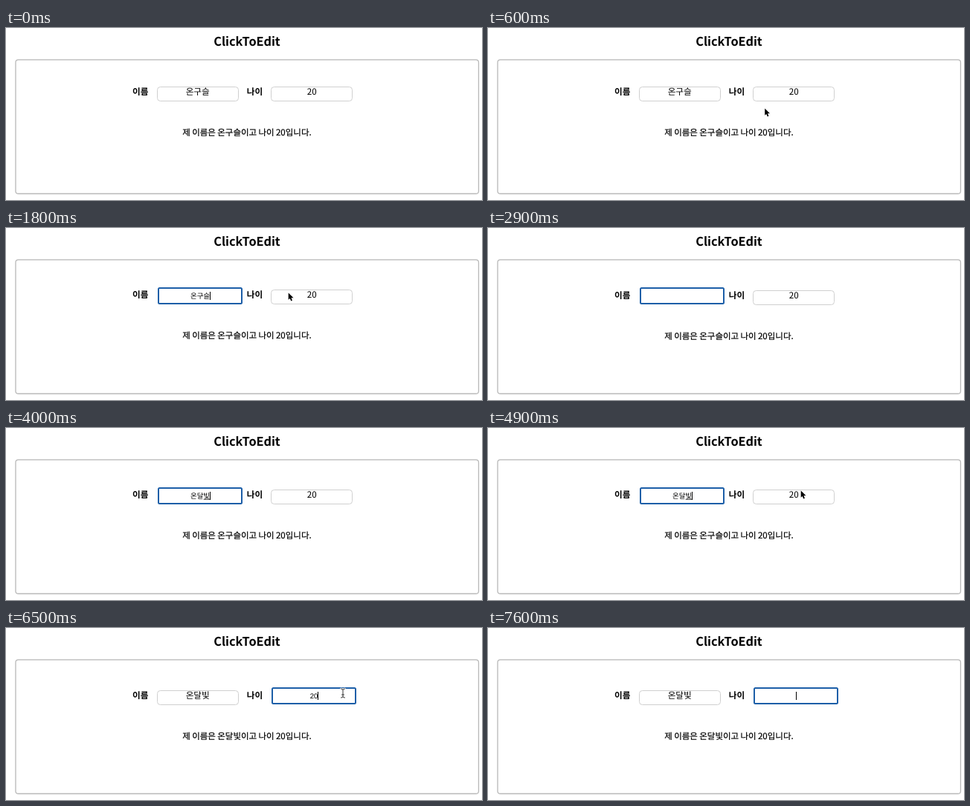
An HTML page for the animation above (8000 ms loop, 640 px wide and 232 px high).

```html
<!DOCTYPE html>
<html lang="ko">
<head>
<meta charset="utf-8">
<title>ClickToEdit</title>
<style>
  html, body { margin: 0; width: 100%; height: 100%; overflow: hidden; background: #fff; }
  svg { display: block; width: 640px; height: 232px; }
  text {
    font: 11.65px "Noto Sans CJK KR", "Noto Sans CJK", sans-serif;
    text-anchor: middle; text-rendering: geometricPrecision; fill: #000;
  }
  .bold { font-weight: 700; }
  .title { font-size: 16.3px; }
  .line { font-size: 11.5px; word-spacing: -.9px; stroke: #000; stroke-width: .2px; }
  .typed { font-size: 9.5px; font-family: "Liberation Sans", "Noto Sans CJK KR", "Noto Sans CJK", sans-serif; }
  .box { fill: #fff; stroke: #d0d0d0; }
  .focus { fill: #fff; stroke: #1d5fa8; stroke-width: 2; }
  .panel { fill: #fff; stroke: #b8b8b8; stroke-width: 1.2; }
  .shade { fill: none; stroke: #000; stroke-opacity: .07; stroke-width: 2; }
</style>
</head>
<body>
<svg viewBox="0 0 640 232">
  <text class="bold title" x="324" y="24.4">ClickToEdit</text>
  <rect class="shade" x="13" y="43.5" width="622.5" height="180.5" rx="4"/>
  <rect class="panel" x="13" y="42.9" width="622.4" height="180.5" rx="3.5"/>
  <g id="row">
    <text class="bold" x="180.7" y="90.4">이름</text>
    <text class="bold" x="334.5" y="90.4">나이</text>
    <g id="nameBox">
      <rect class="box" x="203.5" y="79.5" width="109" height="19" rx="4"/>
      <text id="name" x="257.7" y="90.4"></text>
    </g>
    <g id="ageBox">
      <rect class="box" x="356.5" y="79.5" width="109" height="19" rx="4"/>
      <text id="age" x="411.2" y="90.4">20</text>
    </g>
    <text id="line" class="line" x="324" y="144.9"></text>
  </g>
  <g id="input">
    <rect class="focus" x="-56" y="81" width="112" height="21" rx="1.5"/>
    <text id="typed" class="typed" x="0" y="94.6"></text>
    <path id="under" stroke="#000" stroke-width=".8"/>
    <path id="caret" stroke="#000"/>
  </g>
  <path id="arrow" d="M.2.5V9.8L2.2 8 3.8 11.5 5.4 10.8 4 7.3H7Z" stroke="#fff" stroke-width=".9" paint-order="stroke"/>
  <g id="beam" fill="none" stroke-linecap="round">
    <path d="M-2.5-6Q0-6 0-4.5Q0-6 2.5-6M0-4.5V4.5M-2.5 6Q0 6 0 4.5Q0 6 2.5 6M-1.5 2H1.5" stroke="#fff" stroke-width="2.4"/>
    <path d="M-2.5-6Q0-6 0-4.5Q0-6 2.5-6M0-4.5V4.5M-2.5 6Q0 6 0 4.5Q0 6 2.5 6M-1.5 2H1.5" stroke="#222" stroke-width=".9"/>
  </g>
</svg>
<script>
const LOOP = 8000;
const OLD = "온구슬", NEW = "온달빛";
const $ = id => document.getElementById(id);

// time, edited field, text, caret, composing
const edits = [
  [0, "", ""],
  [1500, "name", OLD, 1],
  [2000, "name", OLD, 0],
  [2200, "name", "온구", 1],
  [2400, "name", "온", 1],
  [2500, "name", "", 1],
  [2900, "name", "", 0],
  [3100, "name", "ㅇ", 1, 1],
  [3200, "name", "오", 1, 1],
  [3300, "name", "온", 1, 1],
  [3400, "name", "온ㄷ", 1, 1],
  [3600, "name", "온다", 1, 1],
  [3700, "name", "온달", 1, 1],
  [3900, "name", "온달비", 1, 1],
  [4000, "name", NEW, 1, 1],
  [4500, "name", NEW, 0, 1],
  [4900, "name", NEW, 1, 1],
  [5100, "", ""],
  [6300, "age", "20", 1],
  [7100, "age", "20", 0],
  [7300, "age", "2", 1],
  [7400, "age", "", 0],
  [7600, "age", "", 1]
];

// time, pointer shape, x, y
const moves = [
  [0, ""],
  [100, "arrow", 11, 206],
  [200, "arrow", 62, 196],
  [300, "arrow", 140, 180],
  [400, "arrow", 232, 157],
  [500, "arrow", 320, 131],
  [600, "arrow", 372, 108],
  [700, "arrow", 387, 94],
  [800, "arrow", 345, 86],
  [900, "arrow", 297, 83],
  [1100, "beam", 267.5, 88.5],
  [1600, "beam", 296, 84],
  [1700, "arrow", 345, 79],
  [1800, "arrow", 379.5, 87],
  [2200, ""],
  [4300, "arrow", 378.5, 88],
  [4500, "arrow", 384.5, 90],
  [4700, "arrow", 421, 82],
  [4900, "arrow", 420.5, 84],
  [5200, "arrow", 420.5, 86],
  [5300, "arrow", 421.5, 87],
  [5600, "arrow", 422.5, 87.5],
  [5700, "arrow", 423.5, 87.5],
  [5900, "arrow", 423, 87],
  [6000, "beam", 418, 90],
  [6100, "beam", 414, 89],
  [6400, "beam", 430, 88],
  [6500, "beam", 453, 88],
  [6700, "arrow", 508, 84],
  [6800, "arrow", 562, 87],
  [7300, ""]
];

const at = (table, t) => table.findLast(step => step[0] <= t);
const show = (el, on) => el.setAttribute("visibility", on ? "visible" : "hidden");
const place = (el, x, y) => el.setAttribute("transform", `translate(${x} ${y})`);
const setText = (el, s) => { if (el.textContent !== s) el.textContent = s; };

function drawForm(t) {
  const [, field, text, caret, composing] = at(edits, t);
  const name = t < 5100 ? OLD : NEW;
  // The row sits on the input's baseline, lower when the field is empty
  const drop = !field ? 0 : field === "name" && text ? 4 : 5;
  place($("row"), 0, drop);
  setText($("name"), name);
  setText($("line"), `제 이름은 ${name}이고 나이 20입니다.`);
  show($("nameBox"), field !== "name");
  show($("ageBox"), field !== "age");
  show($("input"), field);
  place($("input"), field === "age" ? 414 : 261, 0);
  setText($("typed"), text);
  const half = text ? $("typed").getComputedTextLength() / 2 : 0;
  const end = Math.round(half) + .5;
  $("caret").setAttribute("d", `M${end} 86V97`);
  $("under").setAttribute("d", `M${half - 8.5} 96.2H${half}`);
  show($("caret"), field && caret);
  show($("under"), field && composing);
}

function drawPointer(t) {
  const [, shape, x, y] = at(moves, t);
  for (const id of ["arrow", "beam"]) {
    show($(id), id === shape);
    if (id === shape) place($(id), x, y);
  }
}

const start = performance.now();
function tick(now) {
  const t = Math.max(0, now - start) % LOOP;
  drawForm(t);
  drawPointer(t);
  requestAnimationFrame(tick);
}
tick(start);
</script>
</body>
</html>
```
